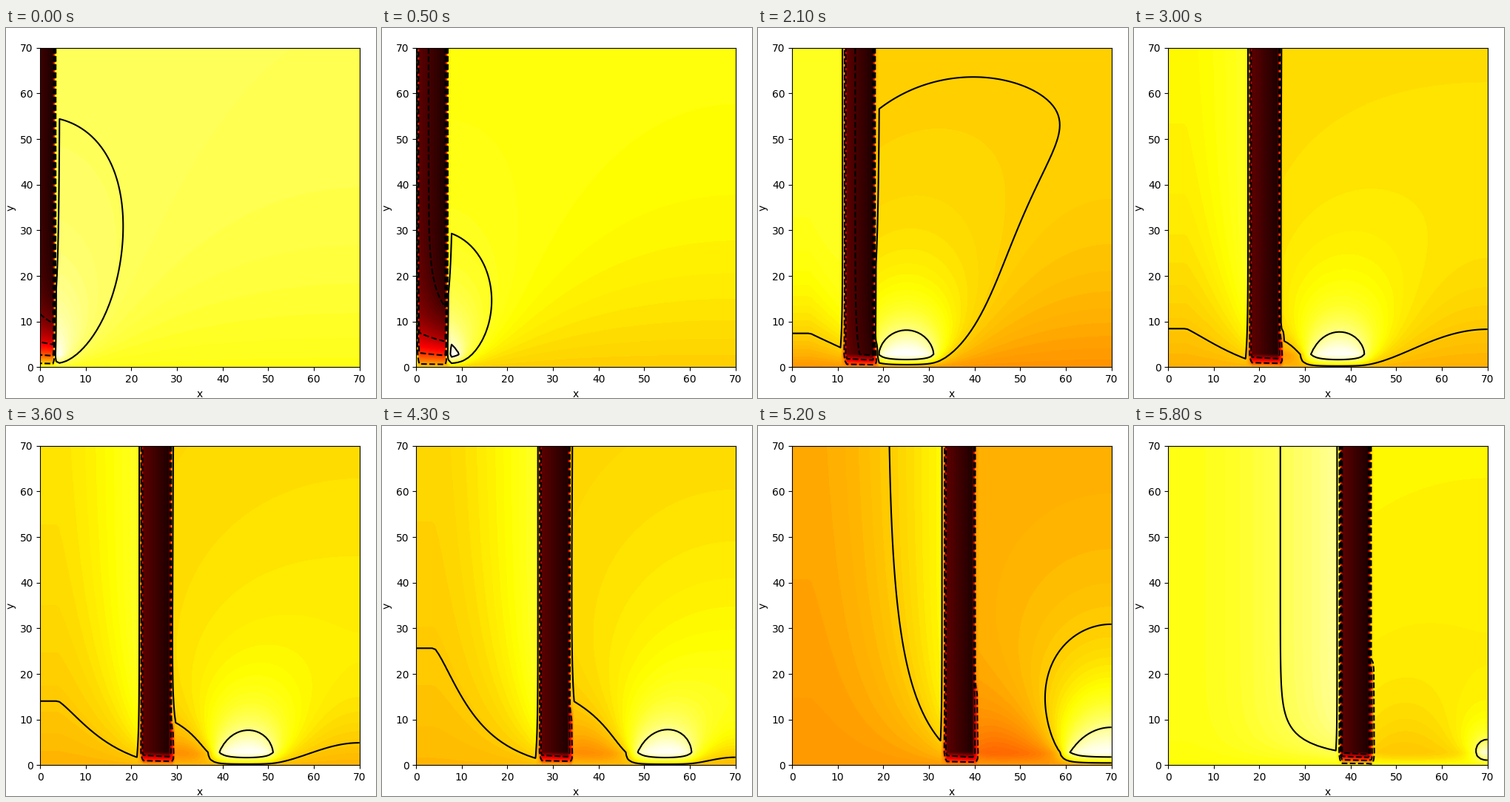
Write a matplotlib script that moves like this. It is 500 px wide and 500 px high and loops after 5.9 s.

```python
import numpy as np
import matplotlib.pyplot as plt
from matplotlib.animation import FuncAnimation

FRAMES, N, SIZE = 59, 100, 70
H = 2.83            # height of the line source
HALF = 4            # half width of the cold band, in cells
grid = np.linspace(0, SIZE, N)
CELL = grid[1]
X, Y = np.meshgrid(grid, grid)
COL = np.arange(N)


def rise(y, length):
    return 1 - np.exp(-y / length)


def floor_value(k):
    return np.interp(k, [0, 12, 30, 46, 52, 58],
                     [.765, .54, .625, .64, .59, .745])


def line_levels(k):
    """Main contour level and the spacing of the others."""
    keys = [0, 12, 30, 52, 58]
    return (np.interp(k, keys, [.838, .69, .662, .67, .825]),
            np.interp(k, keys, [.17, .175, .215, .215, .17]))


def log_integral(d, q):
    return d * np.log(d * d + q * q + 1e-9) + 2 * q * np.arctan(d / q)


def segment(a, b):
    """Potential of a line source above a cold floor."""
    def part(q):
        return log_integral(b - X, q) - log_integral(a - X, q)
    return part(Y + H) - part(Y - H + 1e-6)


def source(a, b, mask):
    """Source mirrored at the right wall, with a peak of 1."""
    b = min(b, SIZE)
    g = segment(a, b) + segment(2 * SIZE - b, 2 * SIZE - a)
    g = np.clip(g / g[mask].max(), 0, 1)
    return g + .8 * g * g * (1 - g)


def right_side(k, base, mask):
    edge = (k + HALF + .5) * CELL
    mid = -2.9 + 1.33 * k
    gain = .2 * (1 - base) * (1 - k / (FRAMES - 1))
    v = base + gain * rise(Y, 25)
    v = v + (1 - v) * source(mid - 6, max(mid + 6, 4.8), mask)
    if mid - 7 > edge + 1:
        v = v - .09 * source(edge, mid - 7, mask)
    return v


def left_side(k, base, age, fresh):
    wall = max((k - HALF - 1) * CELL, 5)
    u = np.clip((X - 4) / (wall - 4), 0, 1)
    far, near = .36 * np.exp(-age / 16), .15 + .2 * fresh
    reach = np.interp(k, [12, 30, 52, 58], [2, 22, 36, 4])
    length = reach + (min(reach, 6) - reach) * u
    height = far + (near - far) * u ** 1.6
    return base + height * rise(Y, length) - .0006 * fresh * Y


def band(k, base, fresh):
    u = np.clip((COL - (k - HALF)) / (2 * HALF), 0, 1)
    core = .03 + .09 * (1 - u)
    soft = fresh ** 2
    fade = soft * np.exp(-Y / 5.5) + (1 - soft) * np.clip(1 - Y / H, 0, 1)
    return core + (base - core) * fade


def field(k):
    base = floor_value(k)
    age = max(k - 12, 0)
    fresh = np.exp(-age / 6)
    ahead = np.broadcast_to(COL > k + HALF, X.shape)
    behind = np.broadcast_to(COL < k - HALF, X.shape)
    v = np.where(ahead, right_side(k, base, ahead), band(k, base, fresh))
    v = np.where(behind, left_side(k, base, age, fresh), v)

    # transition columns on both sides of the band
    bulge = 6 + 9e-5 * k ** 3
    low = np.clip((bulge - grid) / 3, 0, 1) * np.clip(grid / 1.4, 0, 1)
    v[:, k + HALF + 1] *= .95 - .33 * min(k / 21, 1) * low
    if k > HALF:
        v[:, k - HALF - 1] *= 1 - .2 * np.clip(grid / 3, 0, 1)
    return np.clip(v, 0, 1)


fig = plt.figure(figsize=(5, 5), dpi=100)
ax = fig.add_axes([.0922, .0833, .863, .863])
ax.set(xlim=(0, SIZE), ylim=(0, SIZE), xlabel="x", ylabel="y")
drawn = []


def update(k):
    while drawn:
        drawn.pop().remove()
    v = field(k)
    drawn.append(ax.contourf(X, Y, v, np.linspace(0, 1, 101),
                             cmap="hot", vmin=0, vmax=1, extend="both"))
    main, step = line_levels(k)
    steps = [n for n in range(-5, 3) if 0 < main + n * step < 1]
    drawn.append(ax.contour(
        X, Y, v, [main + n * step for n in steps],
        colors="k", linewidths=1.5,
        linestyles=["dashed" if n < 0 else "solid" for n in steps]))
    return drawn


anim = FuncAnimation(fig, update, frames=FRAMES, interval=100,
                     init_func=lambda: [], repeat=True, repeat_delay=0)
plt.show()
```
